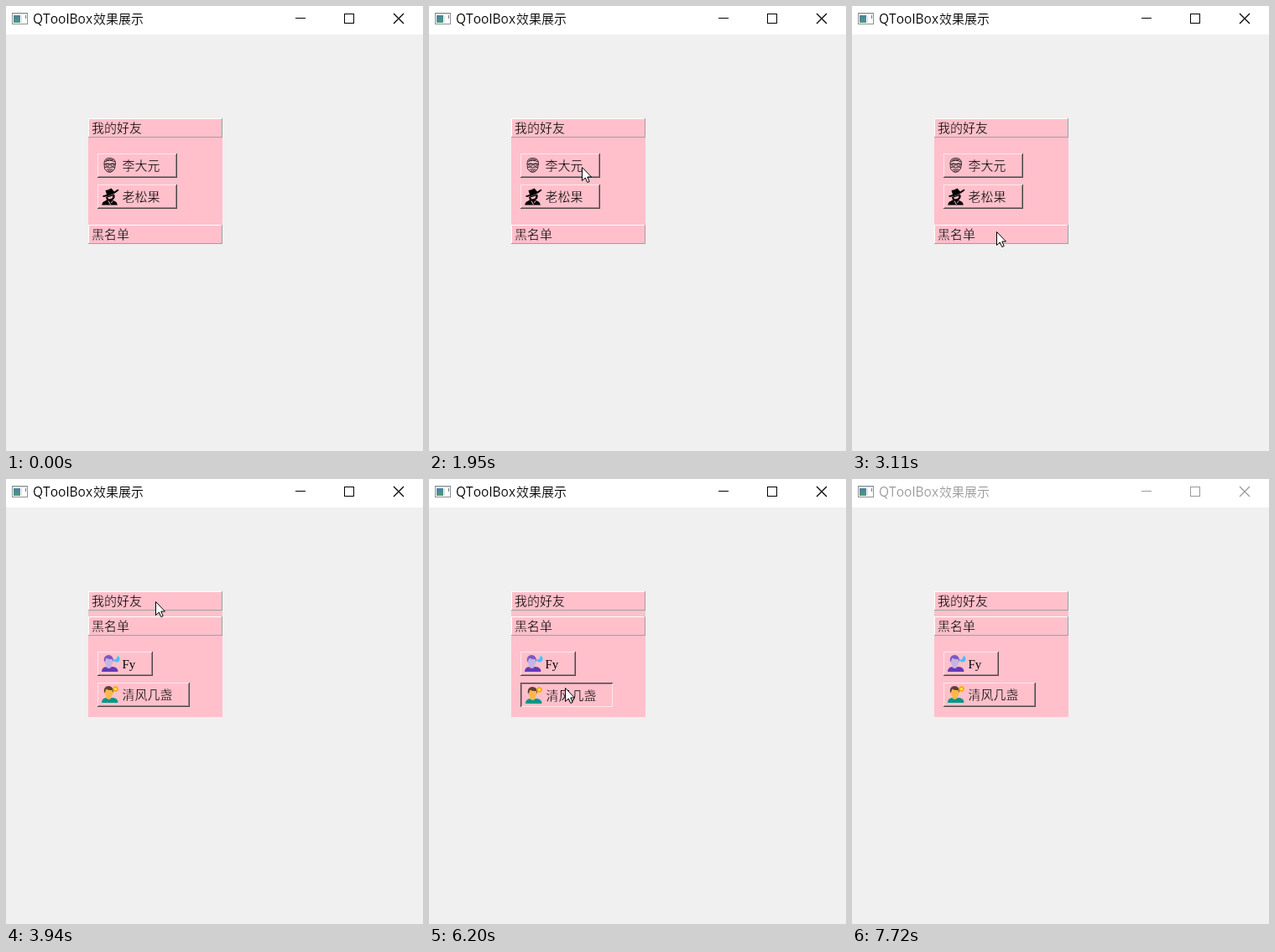
An HTML page for the animation above (7800 ms loop, 497x531 px).

```html
<!DOCTYPE html>
<html lang="zh-CN">
<head>
<meta charset="utf-8">
<title>QToolBox效果展示</title>
<style>
  html, body { margin: 0; width: 100%; height: 100%; overflow: hidden; background: #f0f0f0; }
  svg { display: block; }
  /* the background-coloured stroke thins the glyphs */
  text { font: 300 15px "Noto Sans CJK SC", "Noto Sans CJK", sans-serif; fill: #000; stroke: #ffc0cb; stroke-width: .3px; white-space: pre; }
  .latin { font: 15px "Liberation Serif", serif; stroke: none; }
  .title text { font-weight: 400; stroke: #fff; stroke-width: .2px; }
  .title .name { font: 15.5px "Noto Sans", sans-serif; font-kerning: none; }
  .controls { fill: none; stroke: #000; }
  .inactive text { fill: #999; }
  .inactive .controls { stroke: #999; }
  .bevel { fill: none; shape-rendering: crispEdges; transform-box: fill-box; transform-origin: center; }
  .bevel rect { fill: #ffc0cb; }
  .light { stroke: #fff; }
  .head .dark { stroke: #a0a0a0; }
  .btn .light { stroke: #ffe6ea; }
  .btn .dark { stroke: #4c4346; }
  .btn .mid { stroke: #9f878c; }
  .down .bevel { transform: rotate(180deg); }
  .btn.down .face { transform: translate(1px, 1px); }
</style>
</head>
<body>
<svg width="497" height="531" viewBox="0 0 497 531">
  <defs>
    <linearGradient id="pane" x2="0" y2="1">
      <stop stop-color="#4c7fa5"/><stop offset="1" stop-color="#4f9a78"/>
    </linearGradient>

    <g id="beard" fill="none" stroke="#33282c" stroke-width="1">
      <path d="M3 8Q3 1.500 9.500 1.500Q16.500 1.500 16.500 8L15.500 14Q13 18.500 9.500 18.500T3.500 14Z"/>
      <path d="M4 6Q9 2.500 16 6M5 4.500Q9 1.500 14 4M3 8.500H16.500"/>
      <rect x="5" y="8" width="4" height="3" rx="1"/><rect x="11" y="8" width="4" height="3" rx="1"/>
      <path d="M4 12.500Q7 11.500 9.500 13Q12 11.500 15.500 12.500M6 15H13.500M7 17H12.500"/>
    </g>

    <g id="spy">
      <path d="M4.500 3Q8 2.500 11.500 .500L15 4.500L19.500 1.500L20.500 3Q13 9.500 2 11L1 9.500L6 8Z"/>
      <path d="M5 11L15 7.500Q17 12 13 14.500L17.500 17L19 20.500H0L1.500 17L6 14.500Z"/>
      <path d="M7 11.500L13.500 9.500L12.500 12.500L8.500 13.500Z" fill="#ffc0cb"/>
      <path d="M8 15.500L10.500 20M13 15.500L11.500 18" stroke="#ffc0cb"/>
    </g>

    <g id="person">
      <path d="M0 20Q0 14.500 6 14H13Q19.500 14.500 19.500 20Z" fill="var(--coat)"/>
      <path d="M5.500 11H11.500V14.500Q8.500 17.500 5.500 14.500Z" fill="var(--skin)"/>
      <ellipse cx="8.500" cy="7.500" rx="5" ry="6" fill="var(--skin)"/>
      <path d="M3 8.500Q1.500 .500 8 0Q14.500 0 14 8.500L12.500 5Q7.500 5.500 6 3.500Q4.500 4.500 4.500 6.500Z" fill="var(--hair)"/>
    </g>
    <g id="night" style="--coat:#673ab7;--skin:#c5b4e3;--hair:#7e57c2">
      <use href="#person"/>
      <path d="M18.500 1A3.800 3.800 0 1 1 14 5.500A3.800 3.800 0 0 0 18.500 1Z" fill="#40c4ff"/>
    </g>
    <g id="day" style="--coat:#009688;--skin:#ffb74d;--hair:#5d4037">
      <use href="#person"/>
      <circle cx="16.500" cy="3.500" r="3" fill="#ff9800" stroke="#ffb300" stroke-dasharray="1.500 .8"/>
      <circle cx="16.500" cy="3.500" r="1.800" fill="#ffeb3b"/>
    </g>
  </defs>

  <rect width="497" height="531" fill="#f0f0f0"/>
  <g class="title" id="title">
    <rect width="497" height="34" fill="#fff"/>
    <g shape-rendering="crispEdges">
      <rect x="7.500" y="8.500" width="18" height="13" fill="#fff" stroke="#8b9298"/>
      <path d="M8 9.500H25" stroke="#c9d0d5"/>
      <rect x="9" y="11" width="8" height="9" fill="url(#pane)"/>
      <path d="M18.500 11V20" stroke="#d5d9dc"/>
      <path d="M23.500 11V15" stroke="#6d7f92"/>
    </g>
    <text class="name" x="32" y="21">QToolBox</text>
    <text x="104" y="21">效果展示</text>
    <g class="controls">
      <path d="M345 14.500H357M403.500 9.500H414.500V20.500H403.500Z" shape-rendering="crispEdges"/>
      <path d="M462 9L474 21M474 9L462 21" stroke-width="1.250"/>
    </g>
  </g>
  <rect x="98" y="134" width="160" height="150" fill="#ffc0cb"/>
  <g id="friends"></g>
  <g id="blocked"></g>
  <g id="heads"></g>
  <path id="cursor" d="M.5 .5V16.500L4.300 13L6.800 18.500L9.200 17.500L6.800 12H11.500Z" fill="#fff" stroke="#000"/>
</svg>
<script>
  const LOOP = 7800;
  const $ = id => document.getElementById(id);

  const bevel = (w, h, extra = '') => `<g class="bevel"><rect width="${w}" height="${h}"/>
    <path class="light" d="M.5 ${h - 1}V.5H${w - 1}"/>
    <path class="dark" d="M0 ${h - .5}H${w - .5}V0"/>${extra}</g>`;

  const head = (id, y, label) => `<g class="head" id="${id}" transform="translate(98 ${y})">
    ${bevel(160, 23)}<text x="4" y="17">${label}</text></g>`;

  const button = (id, y, w, icon, label, cls = '') => {
    const mid = `<path class="mid" d="M1 27.500H${w - 1.5}V1"/>`;
    return `<g class="btn" id="${id}" transform="translate(109 ${y})">${bevel(w, 29, mid)}
      <g class="face"><use href="#${icon}" x="5" y="4"/>
      <text class="${cls}" x="29.500" y="20">${label}</text></g></g>`;
  };

  $('heads').innerHTML = head('head1', 134, '我的好友') + head('head2', 261, '黑名单');
  $('friends').innerHTML = button('btn1', 176, 95, 'beard', '李大元') + button('btn2', 213, 95, 'spy', '老松果');
  $('blocked').innerHTML = button('btn3', 206, 66, 'night', 'Fy', 'latin') + button('btn4', 243, 110, 'day', '清风几盏');

  // start, end, number of jumps, x, y
  const moves = [
    [180, 780, 12, 169, 189],
    [1020, 1350, 6, 175, 145],
    [1770, 1950, 4, 182, 192],
    [2330, 2460, 3, 182, 222],
    [2740, 3110, 7, 172, 269],
    [3580, 3940, 8, 178, 146],
    [4060, 4060, 1, 178, 145],
    [4640, 5060, 8, 167, 272],
    [5680, 6020, 7, 162, 249],
    [6450, 7090, 12, 401, 535]
  ];
  const presses = [
    ['head1', 1430, 1560], ['btn1', 2190, 2260], ['btn2', 2610, 2680],
    ['head2', 3390, 3510], ['head1', 4310, 4430], ['head2', 5400, 5530],
    ['btn4', 6200, 6270]
  ];

  const within = (t, a, b) => t >= a && t < b;
  const ease = p => p * p * (3 - 2 * p);

  function pointer(t) {
    let x = 381, y = 532;
    for (const [t0, t1, n, toX, toY] of moves) {
      if (t < t0) break;
      const gap = (t1 - t0) / (n - 1) || 1;
      const jumps = Math.min(n, Math.floor((t - t0) / gap + 1e-6) + 1);
      const p = ease(jumps / n);
      x += (toX - x) * p;
      y += (toY - y) * p;
    }
    return [Math.round(x), Math.round(y)];
  }

  function draw(now) {
    const t = now % LOOP;
    const second = within(t, 3510, 4430) || t >= 5530;
    $('friends').style.display = second ? 'none' : '';
    $('blocked').style.display = second ? '' : 'none';
    $('head2').setAttribute('transform', `translate(98 ${second ? 164 : 261})`);
    for (const id of ['head1', 'head2', 'btn1', 'btn2', 'btn4'])
      $(id).classList.toggle('down', presses.some(([key, a, b]) => key === id && within(t, a, b)));
    $('title').classList.toggle('inactive', t >= 7720);
    $('cursor').setAttribute('transform', `translate(${pointer(t)})`);
  }

  const start = performance.now();
  function tick() {
    draw(performance.now() - start);
    requestAnimationFrame(tick);
  }
  tick();
</script>
</body>
</html>
```
